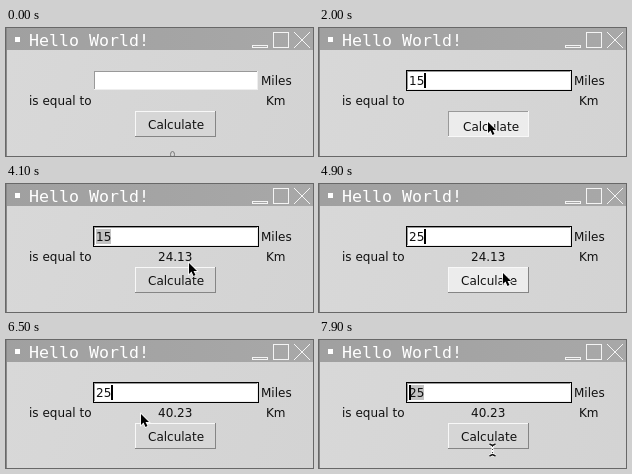
These frames come from a looping animation (307 by 128 pixels, 8000 ms). An HTML page with a canvas:

```html
<!DOCTYPE html>
<html lang="en">
<head>
<meta charset="utf-8">
<title>Miles to Km</title>
<style>
html, body { margin: 0; width: 100%; height: 100%; overflow: hidden; background: #d5d5d5; }
canvas { display: block; }
</style>
</head>
<body>
<canvas id="stage" width="307" height="128"></canvas>
<script>
const ctx = document.getElementById('stage').getContext('2d');
const LOOP = 8000, STEP = 100;
const SANS = '12px "DejaVu Sans", sans-serif';
const MONO = '16.6px "DejaVu Sans Mono", monospace';
const FACE = '#d6d6d6', INK = '#111';

// Pointer stops: time, x, y
const path = [
  [0, 166, 122], [100, 166, 121], [700, 151, 53], [1150, 151, 53],
  [1600, 169, 94], [2150, 169, 94], [2800, 88, 49], [2950, 88, 49],
  [3600, 150, 65], [3850, 150, 65], [4100, 183, 79], [4300, 188, 87],
  [4750, 188, 87], [5100, 179, 92], [6150, 179, 92],
  [6900, 82, 51], [7200, 82, 51], [7900, 173, 110], [8000, 173, 110]
];

const ease = k => k * k * (3 - 2 * k);
const within = (t, a, b) => t >= a && t < b;

function pointerAt(t) {
  const i = path.findIndex((p, n) => n && t <= p[0]);
  const [t0, x0, y0] = path[i - 1], [t1, x1, y1] = path[i];
  const k = ease((t - t0) / (t1 - t0));
  return [Math.round(x0 + (x1 - x0) * k), Math.round(y0 + (y1 - y0) * k)];
}

function entryAt(t) {
  if (t < 900) return '';
  if (t < 1100) return '1';
  if (t < 4400) return '15';
  return t < 4600 ? '2' : '25';
}

function rect(x, y, w, h, color) {
  ctx.fillStyle = color;
  ctx.fillRect(x, y, w, h);
}

function text(s, x, y, font = SANS, color = INK) {
  ctx.font = font;
  ctx.fillStyle = color;
  ctx.fillText(s, x, y);
}

function bevel(x, y, w, h, light, dark) {
  rect(x, y, w, 1, light);
  rect(x, y, 1, h, light);
  rect(x, y + h - 1, w, 1, dark);
  rect(x + w - 1, y, 1, h, dark);
}

function line(points, color, width = 1) {
  ctx.beginPath();
  points.forEach(([x, y], i) => i ? ctx.lineTo(x, y) : ctx.moveTo(x, y));
  ctx.strokeStyle = color;
  ctx.lineWidth = width;
  ctx.stroke();
}

function drawWindow() {
  const body = ctx.createLinearGradient(0, 22, 307, 128);
  body.addColorStop(0, '#d8d8d8');
  body.addColorStop(1, '#d3d3d3');
  rect(0, 0, 307, 128, body);
  const bar = ctx.createLinearGradient(0, 0, 307, 0);
  bar.addColorStop(0, '#a0a0a0');
  bar.addColorStop(1, '#a8a8a8');
  rect(0, 0, 307, 22, bar);
  rect(0, 0, 1, 128, '#888');
  rect(9, 9, 5, 5, '#fff');
  text('Hello World!', 23, 18, MONO, '#fff');
  ctx.strokeStyle = '#f4f4f4';
  ctx.lineWidth = 1;
  ctx.strokeRect(246.5, 17.5, 15, 2);
  ctx.strokeRect(267.5, 4.5, 15, 15);
  line([[288, 4], [304, 20]], '#f4f4f4');
  line([[304, 4], [288, 20]], '#f4f4f4');
}

function drawEntry(t) {
  const value = entryAt(t), focused = t >= 700;
  if (focused) rect(87, 42, 166, 21, '#000');
  rect(88, 43, 164, 19, '#fff');
  bevel(88, 43, 164, 19, '#999', '#eee');

  const dragging = within(t, 3000, 4400) || t >= 7300;
  ctx.font = SANS;
  const width = Math.round(ctx.measureText(value).width);
  if (dragging) {
    const chars = within(t, 3000, 3200) || within(t, 7300, 7500) ? 1 : 2;
    rect(90, 45, Math.round(width * chars / 2), 15, '#c3c3c3');
  }
  text(value, 90, 57);

  const blinkOff = within(t, 1300, 1600) || within(t, 2200, 2500) ||
    within(t, 3900, 4400) || within(t, 5100, 5500) || within(t, 5700, 6000) ||
    within(t, 6600, 6900);
  if (focused && !blinkOff) {
    rect(dragging ? 90 : 90 + width, 45, 2, 15, '#000');
  }
}

function drawButton(t, x, y) {
  const over = within(x, 129, 210) && within(y, 83, 109) && t < 6700;
  const pressed = within(t, 2000, 2100) || within(t, 5700, 5800);
  rect(129, 83, 81, 26, over ? '#ececec' : FACE);
  bevel(129, 83, 81, 26, pressed ? '#999' : '#f8f8f8', pressed ? '#f8f8f8' : '#858585');
  const shift = pressed ? 2 : 0;
  text('Calculate', 142 + shift, 101 + shift);
}

function drawArrow(x, y) {
  ctx.beginPath();
  [[0, 0], [0, 11], [2.5, 8.5], [4.5, 13], [6.5, 12], [4.5, 8], [8, 8]]
    .forEach(([dx, dy], i) => i ? ctx.lineTo(x + dx, y + dy) : ctx.moveTo(x + dx, y + dy));
  ctx.closePath();
  ctx.strokeStyle = '#fff';
  ctx.lineWidth = 1.5;
  ctx.stroke();
  ctx.fillStyle = '#000';
  ctx.fill();
}

// Text beam: dark caps joined by a dotted stem on a white halo
function drawBeam(x, y) {
  const cx = x + 0.5;
  const stem = [[cx, y - 4], [cx, y + 4]];
  const caps = [-1, 1].map(s =>
    [[cx - 3, y + 6 * s], [cx, y + 4.5 * s], [cx + 3, y + 6 * s]]);
  line(stem, '#fff', 2);
  caps.forEach(cap => line(cap, '#fff', 3));
  caps.forEach(cap => line(cap, '#111', 1.5));
  ctx.setLineDash([1, 2]);
  line(stem, '#444');
  ctx.setLineDash([]);
}

function drawPointer(t, x, y) {
  if (t < 100) {
    ctx.strokeStyle = '#777';
    ctx.lineWidth = 1;
    ctx.beginPath();
    ctx.ellipse(166.5, 126.5, 2, 3, 0, 0, Math.PI * 2);
    ctx.stroke();
    return;
  }
  const grabbed = within(t, 2900, 3700) || t >= 7200;
  const overEntry = within(x, 81, 253) && within(y, 43, 62);
  (grabbed || overEntry ? drawBeam : drawArrow)(x, y);
}

function draw(t) {
  const [x, y] = pointerAt(t);
  drawWindow();
  drawEntry(t);
  text('Miles', 255, 57);
  text('is equal to', 23, 77);
  text('Km', 260, 77);
  if (t >= 2100) text(t < 5800 ? '24.13' : '40.23', 152, 77);
  drawButton(t, x, y);
  drawPointer(t, x, y);
}

function tick() {
  const t = performance.now() % LOOP;
  draw(Math.floor(t / STEP) * STEP);
  requestAnimationFrame(tick);
}
tick();
</script>
</body>
</html>
```
